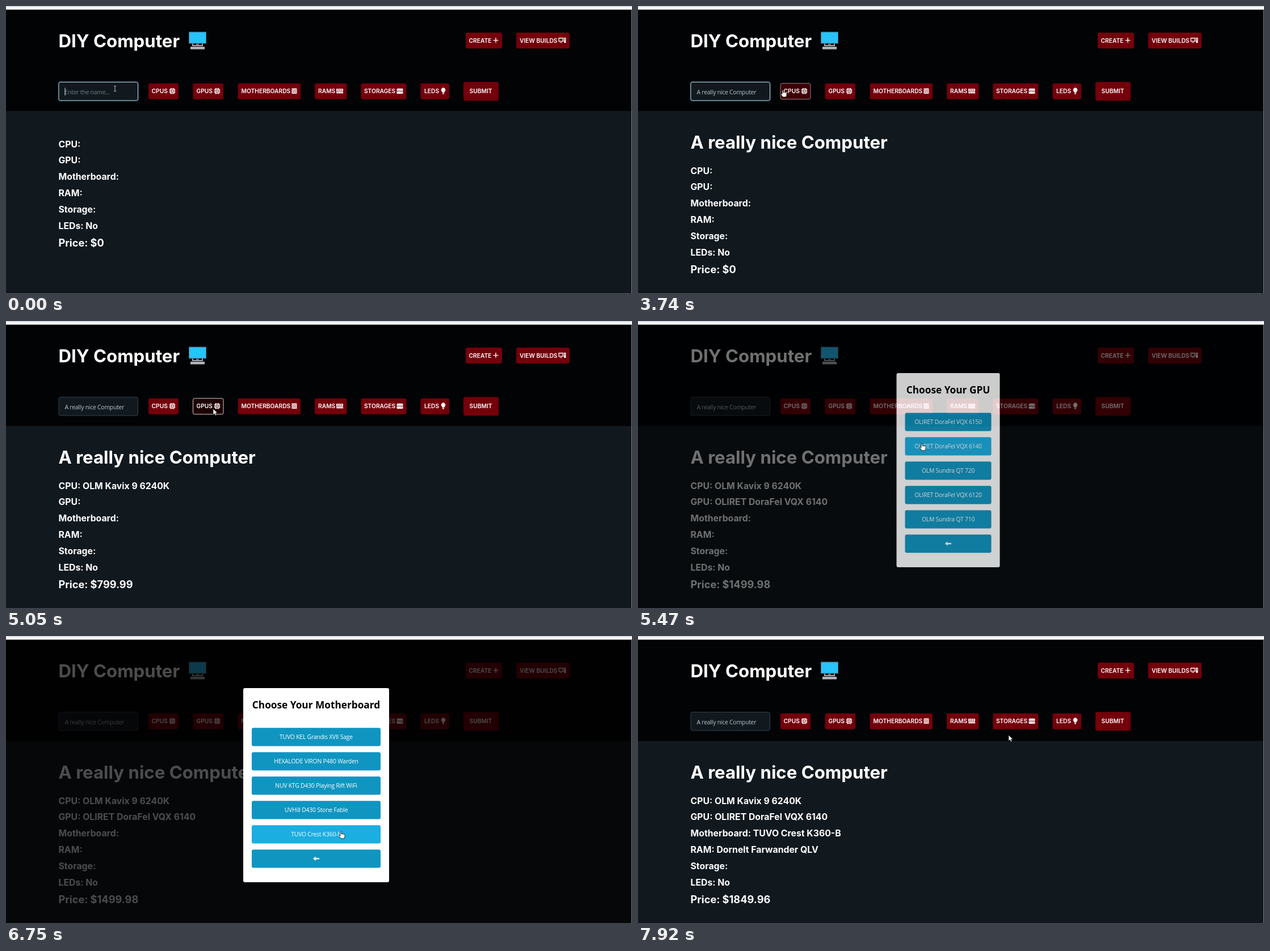
Write an HTML page that moves like this. It is 1103 px wide and 507 px high and loops after 8000 ms.

```html
<!DOCTYPE html>
<html lang="en">
<head>
<meta charset="utf-8">
<title>DIY Computer</title>
<style>
  html, body { margin: 0; width: 100%; height: 100%; overflow: hidden; background: #11191f; }
  svg { display: block; width: 1103px; height: 507px; }
  text { white-space: pre; fill: #fff; font-family: Inter, sans-serif; font-weight: 700; }
  .big { font-size: 31.2px; }
  .line { font-size: 15.8px; }
  .price { font-size: 18.2px; }
  .btn text { font-size: 10.25px; font-weight: 600; }
  .icon { fill: #fff; fill-rule: evenodd; }
  .field text, .row text { font: 400 10.4px "Open Sans", "Noto Sans", sans-serif; letter-spacing: -.22px; }
  .field text { fill: #b9c5cd; }
  .field .hint { fill: #6d7b85; }
  .row text { text-anchor: middle; }
  .head { font: 700 17.25px "Open Sans", "Noto Sans", sans-serif; text-anchor: middle; fill: #000; }
</style>
</head>
<body>
<svg id="stage" viewBox="0 0 1103 507">
  <rect width="1103" height="507" fill="#11191f"/>
  <rect y="6" width="1102" height="179.500" fill="#020305"/>

  <text class="big" x="92.500" y="72.500">DIY Computer</text>
  <g id="screen">
    <rect x="322.500" y="46" width="30" height="20" fill="#27c3fb" stroke="#5b6672"/>
    <path d="M335 66.500h5v3h-5z" fill="#6d6f78"/>
    <path d="M329 66.500v3.500h17v-3.500" fill="none" stroke="#a9acb2" stroke-width="2"/>
    <rect x="325" y="72" width="25" height="4.500" fill="#b5b7bb"/>
  </g>

  <g id="buttons"></g>

  <g class="field">
    <rect id="glow" x="91.500" y="133" width="142.500" height="35.500" rx="4" fill="#10445a" opacity=".6"/>
    <rect id="box" x="93" y="134.500" width="139.500" height="32.500" rx="3" fill="#11191f"/>
    <text class="hint" id="hint" x="103.500" y="155.500">Enter the name...</text>
    <text id="typed" x="103.500" y="155.500"></text>
    <rect id="caret" y="144.500" width="1" height="13.500" fill="#dde6ec"/>
  </g>

  <text class="big" id="name" x="92.500" y="251.500"></text>
  <g id="specs"></g>

  <g id="modal">
    <rect y="6" width="1102" height="501" fill="#000" opacity=".7"/>
    <g id="card"></g>
  </g>

  <rect width="1103" height="6.500" fill="#f4f6f9"/>
  <rect width="1103" height="1" fill="#c3c8ce"/>
  <rect x="1102" y="6" width="1" height="501" fill="#85898d"/>

  <g id="pointer">
    <path id="i" d="M-2-4.500h1.500L0-4 .5-4.500H2M0-4v8M-2 4.500h1.500L0 4l.5.5H2" fill="none" stroke="#d4d8da" stroke-width=".9"/>
    <path id="a" d="M0 0V10.500L2.500 8.300 4.200 12 6 11.200 4.400 7.600H7.600Z" fill="#fff" stroke="#111" stroke-width=".7"/>
    <path id="h" d="M-1 1Q0-.5 1 1V5l1-.6 1.200.6 1.200-.3 1 .7 1-.1.600 1V9L5.800 12.800H.2L-3.500 7.800Q-3.500 6-1 7.800Z" fill="#fff" stroke="#111" stroke-width=".8"/>
  </g>
</svg>

<script>
const LOOP = 8000, FADE = 200;
const $ = id => document.getElementById(id);
const clamp = v => Math.max(0, Math.min(1, v));
const show = (el, on) => el.setAttribute('visibility', on ? 'visible' : 'hidden');
// Last entry of a step list that has already begun
const latest = (list, t) => list.filter(e => e[0] <= t).pop();
const pulse = (t, from, to) => clamp((t - from) / FADE) - clamp((t - to) / FADE);

const chip = 'M-4-4h8v8h-8zM-2.500-2.500v5h5v-5zM-1.500-1.500h3v3h-3z' +
  [-2.5, 0, 2.5].map(p => `M${p - .5}-5.500h1v1.500h-1zM${p - .5} 4h1v1.500h-1z` +
    `M-5.500 ${p - .5}h1.500v1h-1.500zM4 ${p - .5}h1.500v1h-1.500z`).join('');

let board = 'M-4.500-4.800h9v9.600h-9z';
for (let r = 0; r < 5; r++)
  for (let c = 0; c < 5; c++)
    if ((r + c) % 2 == 0) board += `M${c * 1.5 - 3.6} ${r * 1.5 - 3.6}h1.200v1.200h-1.200z`;

const icons = {
  chip, board,
  plus: 'M-.7-4.500H.7V-.7H4.500V.7H.7V4.500H-.7V.7H-4.500V-.7H-.7z',
  desk: 'M-6.500-4.500h8.500v7h-8.500zM-5.200-3.200v4.300h5.900v-4.300zM-4.500 3.300h4.500v1.200h-4.500zM3-4.500h3.500v9h-3.500zM4-3.200v1h1.500v-1zM4-1v1h1.500v-1z',
  ram: 'M-6-4h12v2q-1 .8 0 1.600V1h-12V-.4q1-.8 0-1.600zM-3.800-2.700v2.200h1.500v-2.200zM-.7-2.700v2.200h1.500v-2.200zM2.400-2.700v2.200h1.500v-2.200z' +
    'M-6 1.800h12v2.400h-1.500v-1h-1v1h-2v-1h-1v1h-2v-1h-1v1h-2v-1h-1v1h-.5z',
  disk: 'M-5.500-.6V-3q0-1.500 1.500-1.500h8q1.500 0 1.500 1.500v2.400zM-5.500.4h11v3q0 1.200-1.200 1.200h-8.600q-1.200 0-1.200-1.200zM.8 2v1h1v-1zM3 2v1h1v-1z',
  bulb: 'M-1.800 2.500Q-2 1.300-3 .1A3.700 3.700 0 1 1 3 .1Q2 1.300 1.800 2.500zM-1.800 3.200h3.600q0 2.300-1.800 2.300t-1.800-2.300z'
};

// label, left, width, text x, icon, icon x
const bar = [
  ['CPUS', 251, 53, 256.5, 'chip', 293], ['GPUS', 329.5, 53.5, 335.5, 'chip', 372],
  ['MOTHERBOARDS', 408.5, 110.5, 414.5, 'board', 508], ['RAMS', 544, 56.5, 550, 'ram', 588],
  ['STORAGES', 625.5, 80, 631, 'disk', 694], ['LEDS', 730.5, 50.5, 737, 'bulb', 770.5],
  ['SUBMIT', 806, 62, 816.5], ['CREATE', 810, 64, 815.5, 'plus', 863], ['VIEW BUILDS', 899, 94, 905, 'desk', 980]
];
$('buttons').innerHTML = bar.map(([label, x, w, tx, icon, ix], n) => {
  const mid = n > 6 ? 61 : 150.7, h = label == 'SUBMIT' ? 33 : 28;
  return `<g class="btn"><rect x="${x}" y="${mid - h / 2}" width="${w}" height="${h}" rx="3" fill="#73000b" stroke="#fff" stroke-opacity="0"/>
    <text x="${tx}" y="${mid + 3.6}">${label}</text>
    ${icon ? `<path class="icon" transform="translate(${ix} ${mid - .4})" d="${icons[icon]}"/>` : ''}</g>`;
}).join('');
const plates = [...document.querySelectorAll('.btn rect')];

const specs = ['CPU:', 'GPU:', 'Motherboard:', 'RAM:', 'Storage:', 'LEDs: No', 'Price: $'];
const prices = ['0', '799.99', '1499.98', '1699.97', '1849.96'];
$('specs').innerHTML = specs.map((s, n) =>
  `<text class="${n < 6 ? 'line' : 'price'}" x="92.500" y="${n < 6 ? 249.5 + n * 28.8 : 425.3}"></text>`).join('');
const specLines = [...$('specs').children];

// Each dialog: opening and closing time, half width of a row, picked row
const dialogs = [
  { title: 'CPU', open: 3880, close: 4620, half: 73.5, pick: 1,
    items: ['OLM Kavix 7 4720K', 'OLM Kavix 9 6240K', 'Tembra Duon 8-3060', 'OLM Kavix 5 4410K', 'Tembra Duon 6-2040'] },
  { title: 'GPU', open: 5130, close: 5430, half: 76, pick: 1,
    items: ['OLIRET DoraFel VQX 6150', 'OLIRET DoraFel VQX 6140', 'OLM Sundra QT 720', 'OLIRET DoraFel VQX 6120', 'OLM Sundra QT 710'] },
  { title: 'Motherboard', open: 5910, close: 6800, half: 113.5, pick: 4,
    items: ['TUVO KEL Grandis XVII Sage', 'HEXALODE VIRON P480 Warden', 'NUV KTG D430 Playing Rift WiFi', 'UVHill D430 Stone Fable', 'TUVO Crest K360-B'] },
  { title: 'RAM', open: 7170, close: 7700, half: 92.5, pick: 1,
    items: ['Q.Vale Harpoon N Glow', 'Dornelt Farwander QLV', 'Ostrin Wildfire Dusk', 'Pellam Ballast Max', 'Yorvik Z-Storm Delta'] }
];
const hovers = [[3640, 3880], [4890, 5130], [5680, 5910], [6990, 7170]];

const MID = 546.5, ROW = 162.3, STEP = 43;
const cards = dialogs.map(d => {
  const rows = [...d.items, ''].map((item, n) => {
    const y = ROW + n * STEP;
    return `<g class="row"><rect x="${MID - d.half}" y="${y}" width="${d.half * 2}" height="32.300" rx="3"/>
      <text x="${MID}" y="${y + 19.8}">${item}</text>
      ${item ? '' : `<path d="M${MID - 5.5} ${y + 16}l4.500-4v2.700h6.500v2.600h-6.500v2.700z" fill="#fff"/>`}</g>`;
  }).join('');
  return `<rect x="${MID - d.half - 15}" y="92" width="${d.half * 2 + 30}" height="343" rx="3" fill="#fff"/>
    <text class="head" x="${MID}" y="127.500">Choose Your ${d.title}</text>${rows}`;
});

const phrase = 'A really nice Computer';
const typing = [
  [0, 0], [680, 1], [800, 2], [950, 4], [1070, 6], [1220, 7], [1370, 9], [1490, 10], [1610, 13],
  [1760, 14], [1880, 15], [2030, 17], [2160, 18], [2300, 19], [2420, 20], [2670, 22]
];
// time, x, y, pointer shape
const moves = [
  [0, 192, 146, 'i'], [3320, 193, 146, 'i'], [3470, 208, 145, 'i'], [3620, 244, 146, 'a'],
  [3740, 255, 148, 'h'], [3860, 258, 149, 'h'], [3990, 275, 153, 'h'], [4110, 398, 177, 'a'],
  [4250, 485, 190, 'h'], [4400, 494, 212, 'h'], [4540, 496, 216, 'h'], [4680, 488, 214, 'h'],
  [4800, 460, 200, 'a'], [4930, 400, 172, 'a'], [5050, 365, 155, 'a'], [5200, 366, 154, 'h'],
  [5320, 495, 212, 'h'], [5470, 500, 216, 'h'], [5590, 500, 210, 'a'], [5710, 484, 180, 'a'],
  [5870, 475, 156, 'h'], [5990, 476, 156, 'h'], [6110, 490, 180, 'h'], [6230, 525, 240, 'h'],
  [6380, 555, 290, 'h'], [6500, 575, 325, 'a'], [6630, 588, 343, 'h'], [6750, 590, 345, 'h'],
  [6870, 588, 340, 'h'], [7020, 580, 230, 'a'], [7140, 573, 156, 'h'], [7260, 573, 156, 'h'],
  [7380, 569, 175, 'h'], [7530, 567, 212, 'h'], [7650, 566, 216, 'h'], [7800, 600, 205, 'a'],
  [7920, 653, 175, 'a']
];
const rowAt = y => Math.floor((y - ROW) / STEP);

let shown = -1;
function drawModal(now, y, lastY) {
  const n = dialogs.findIndex(d => now >= d.open && now < d.close + FADE);
  show($('modal'), n >= 0);
  if (n < 0) return;
  if (n != shown) { $('card').innerHTML = cards[n]; shown = n; }
  const d = dialogs[n];
  $('modal').setAttribute('opacity', pulse(now, d.open, d.close));
  const hot = now >= d.close ? d.pick : rowAt(y) == rowAt(lastY) ? rowAt(y) : -1;
  document.querySelectorAll('.row rect').forEach((r, k) =>
    r.setAttribute('fill', k == hot ? '#1aaee1' : '#1095c1'));
}

function draw(t) {
  const move = latest(moves, t), [now, x, y, shape] = move;
  const before = moves[Math.max(0, moves.indexOf(move) - 1)];
  const text = phrase.slice(0, latest(typing, t)[1]);

  $('typed').textContent = text;
  $('name').textContent = text;
  show($('hint'), !text);
  show($('caret'), t < 120 || (t >= 680 && t < 3320));
  $('caret').setAttribute('x', 103.5 + (text ? $('typed').getComputedTextLength() : 0));
  const focus = now < 3880;
  show($('glow'), focus);
  $('box').setAttribute('stroke', focus ? '#bfdce6' : '#33434e');

  $('specs').setAttribute('transform', `translate(0 ${text ? 47.2 : 0})`);
  const done = dialogs.filter(d => now >= d.close).length;
  specLines.forEach((el, n) => {
    const d = dialogs[n];
    el.textContent = specs[n] + (n == 6 ? prices[done] : n < done ? ' ' + d.items[d.pick] : '');
  });

  hovers.forEach(([on, off], n) => {
    const p = pulse(now, on, off);
    plates[n].setAttribute('fill', `rgb(${115 - 107 * p} 0 ${11 - 10 * p})`);
    plates[n].setAttribute('stroke-opacity', p);
  });

  drawModal(now, y, before[2]);
  $('pointer').setAttribute('transform', `translate(${x} ${y})`);
  for (const s of 'iah') show($(s), s == shape);
}

const start = performance.now();
(function loop() {
  draw((performance.now() - start) % LOOP);
  requestAnimationFrame(loop);
})();
</script>
</body>
</html>
```
